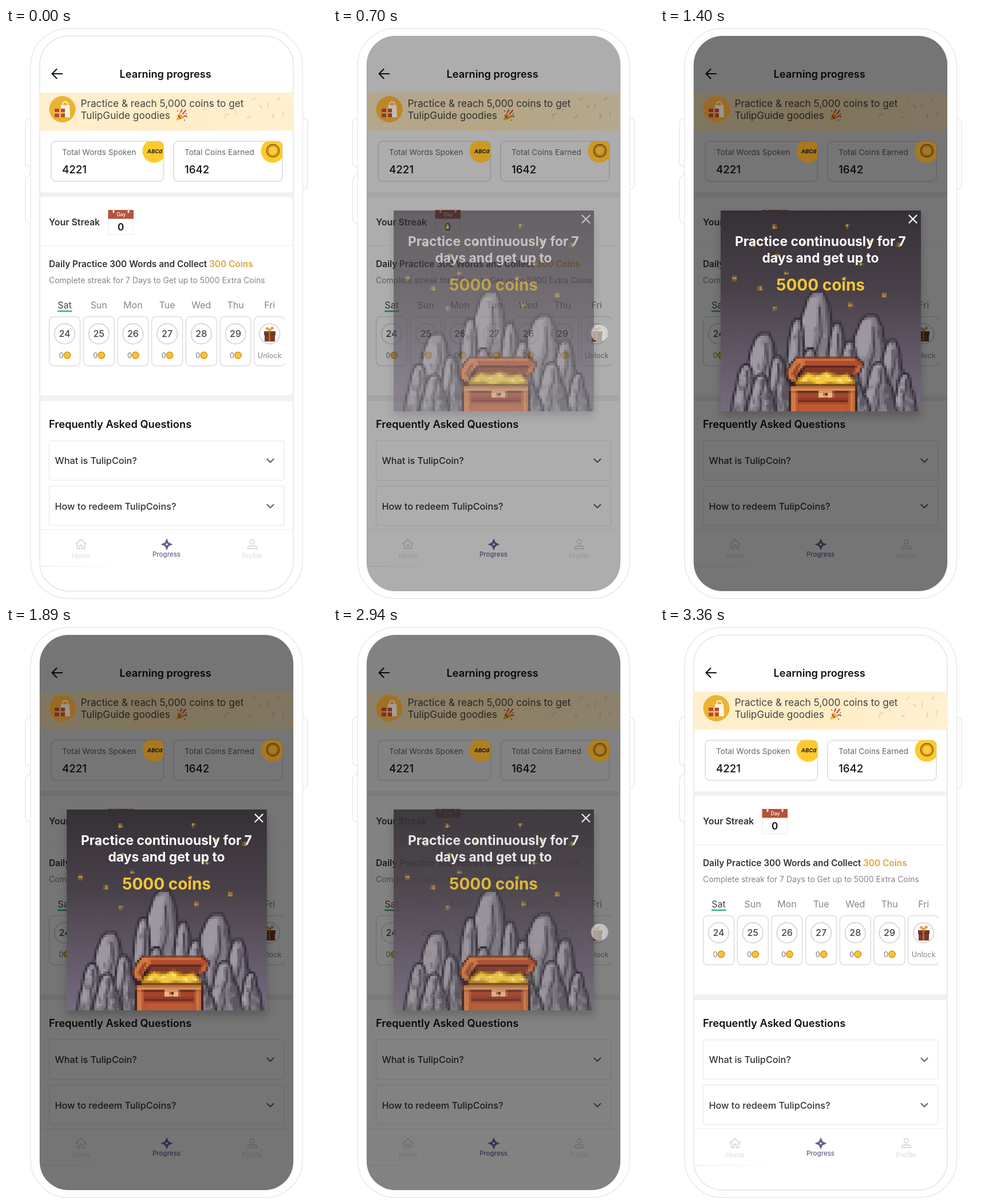
An HTML page with a canvas that plays this animation: 561x998 px, repeating every 3780 ms.

```html
<!DOCTYPE html>
<html lang="en">
<head>
<meta charset="utf-8">
<title>Learning progress</title>
<style>
html, body { margin: 0; width: 100%; height: 100%; overflow: hidden; background: #fff; }
svg, canvas { position: absolute; left: 0; top: 0; }
svg { font-family: Inter, Roboto, sans-serif; }
#art { left: 106px; top: 319px; width: 350px; height: 351px; image-rendering: pixelated; box-shadow: 0 9px 14px rgba(0,0,0,.22); }
.m { text-anchor: middle; }
.w5 { font-weight: 500; }
.w6 { font-weight: 600; }
.w7 { font-weight: 700; }
.line { fill: none; stroke-linecap: round; stroke-linejoin: round; }
</style>
</head>
<body>
<svg id="base" width="561" height="998" viewBox="0 0 561 998">
  <defs>
    <clipPath id="screen"><rect x="59" y="14" width="443" height="970" rx="50"/></clipPath>
    <clipPath id="stats"><rect x="79" y="198" width="196.500" height="70" rx="8"/><rect x="293" y="198" width="190" height="70" rx="8"/></clipPath>
    <clipPath id="week"><rect x="70" y="500" width="417" height="100"/></clipPath>
    <linearGradient id="sand"><stop stop-color="#ffefcf"/><stop offset=".5" stop-color="#ffedc6"/><stop offset="1" stop-color="#fff0d2"/></linearGradient>
    <linearGradient id="fade"><stop stop-color="#e2e2e2"/><stop offset="1" stop-color="#e2e2e2" stop-opacity="0"/></linearGradient>
  </defs>

  <g fill="#fff" stroke="#e9e9e9" stroke-width="1.500">
    <path d="M43 157 Q34 159 34 167 V235 Q34 241 39 241 Q43 242 43 249 Q43 257 39 259 Q34 261 34 268 V331 Q34 340 43 342"/>
    <path d="M518 157 Q527 159 527 167 V273 Q527 281 518 283"/>
    <rect x="43" y=".7" width="475.500" height="996.500" rx="66"/>
    <rect x="59" y="14" width="443" height="970" rx="50" stroke="#e4e4e6"/>
  </g>

  <g clip-path="url(#screen)">
    <path class="line" d="M98 80H81M88.500 72L80.500 80L88.500 88" stroke="#111" stroke-width="2.200"/>
    <text class="w6" x="198.500" y="87" font-size="18.200" fill="#111">Learning progress</text>

    <g fill="#fff" stroke="#d8dae0" stroke-width="1.500">
      <rect x="79" y="198" width="196.500" height="70" rx="8"/>
      <rect x="293" y="198" width="190" height="70" rx="8"/>
    </g>
    <g font-size="13.700" fill="#666"><text x="98" y="222">Total Words Spoken</text><text x="312" y="222">Total Coins Earned</text></g>
    <g class="w5" font-size="18.700" fill="#111"><text x="98" y="254">4221</text><text x="312" y="254">1642</text></g>

    <path d="M59 287h444v8.500h-444zM59 642h444v10h-444z" fill="#f1f1f2"/>
    <path d="M59 380.500h444M59 876.500h444" stroke="#eee"/>
    <rect x="59" y="940.500" width="150" height="1" fill="url(#fade)"/>

    <text class="w6" x="75" y="345" font-size="15.900" fill="#333">Your Streak</text>
    <rect x="179" y="319" width="43.500" height="42" fill="#fff" stroke="#e6e6e6"/>
    <path d="M178.500 318h44.500v15.500h-44.500z" fill="#b4533d"/>
    <path class="line" d="M188 317v5M214 317v5" stroke="#f3dfdc" stroke-width="3"/>
    <text class="m w5" x="201.500" y="329" font-size="8.500" fill="#fff">Day</text>
    <text class="m w6" x="200.500" y="353.500" font-size="17" fill="#111">0</text>

    <text class="w6" x="75" y="418" font-size="15.400" fill="#333">Daily Practice 300 Words and Collect <tspan fill="#dca63b">300 Coins</tspan></text>
    <text x="75" y="445.500" font-size="13.950" fill="#858585">Complete streak for 7 Days to Get up to 5000 Extra Coins</text>
    <g id="days"></g>
    <path d="M90 495h25.500" stroke="#35b57e" stroke-width="2.600"/>

    <text class="w6" x="75" y="698.500" font-size="18.300" fill="#111">Frequently Asked Questions</text>
    <g fill="#fff" stroke="#ebebf4" stroke-width="1.500">
      <rect x="75.500" y="721.500" width="410.500" height="69" rx="3"/>
      <rect x="75.500" y="800.500" width="410.500" height="69" rx="3"/>
    </g>
    <g class="w5" font-size="16.200" fill="#333">
      <text x="85.500" y="762">What is TulipCoin?</text>
      <text x="85.500" y="841.500">How to redeem TulipCoins?</text>
    </g>
    <path class="line" d="M456.500 753.500l5.500 5.500l5.500-5.500M456.500 833l5.500 5.500l5.500-5.500" stroke="#666" stroke-width="2.200"/>

    <g class="line" stroke="#d9d9dc" stroke-width="1.800">
      <path d="M122 902l9-8l9 8M124.500 901v9h4.500v-6h4v6h4.500v-9"/>
      <circle cx="430.500" cy="898" r="3.800"/>
      <path d="M422.500 910v-2q0-3 8-3t8 3v2z"/>
    </g>
    <g class="m" font-size="11.500" fill="#dcdce0"><text x="131" y="926.500">Home</text><text x="430" y="926.500">Profile</text></g>

    <rect id="dim" x="59" y="14" width="444" height="971"/>

    <g id="soft">
      <path d="M59 113h444v66.500h-444z" fill="url(#sand)"/>
      <path class="line" stroke="#f4bd9b" stroke-width="2.600" opacity=".6" d="M443 135l4 4M467 150v7M357 130l4 6M389 150l-5 2M422 157l5-3M475 126l3-4"/>
      <path class="line" stroke="#e6d8b5" stroke-width="2.600" opacity=".7" d="M345 143l5-3M371 127l6 3M401 143v6M436 122l-5 4M458 131v9M484 146v8M383 153v5"/>
      <g font-size="17.200" fill="#444"><text x="130.500" y="137.500">Practice &amp; reach 5,000 coins to get</text><text x="130.500" y="159">TulipGuide goodies</text></g>
      <path d="M297 162l6-14l9 9z" fill="#e8b13f"/>
      <path class="line" d="M305 147q3-4 2-4M311 154q4-1 5 1M309 150l5-6M301 153l4 5" stroke="#cf4c43" stroke-width="2.200"/>
      <path d="M299 144h2v2h-2zM314 149h2v2h-2zM311 160h2v2h-2z" fill="#5b80b8"/>
      <g class="m">
        <path d="M281 892l3.300 7.200l7.200 3.300l-7.200 3.300l-3.300 7.200l-3.300-7.200l-7.200-3.300l7.200-3.300z" fill="#67628d"/>
        <circle cx="281" cy="902.500" r="1.700" fill="#fff"/>
        <text class="w5" x="280.500" y="924" font-size="11.500" fill="#65608a">Progress</text>
      </g>
    </g>
    <g id="gold">
      <circle cx="98.500" cy="142" r="23" fill="#ebb332"/>
      <path d="M96 135h15l1 21h-17z" fill="#fff3e4"/>
      <path class="line" d="M99 138v-4q0-5 4.500-5t4.500 5v4" stroke="#fff3e4" stroke-width="1.800"/>
      <path d="M85 141h18v15h-18z" fill="#b94a32"/>
      <path d="M85 147h18v2.500h-18zM93 141h3v15h-3z" fill="#f0bd61"/>
      <g clip-path="url(#stats)">
        <circle cx="259" cy="215" r="20.500" fill="#ffca2b"/>
        <circle cx="466" cy="215" r="20.500" fill="#ffca2b"/>
      </g>
      <text class="m w7" x="260" y="218.500" font-size="9.500" font-style="italic" fill="#222">ABCd</text>
      <circle cx="466.500" cy="214.500" r="11" fill="#f1b32b" stroke="#7d5514" stroke-width="1.400"/>
      <circle cx="466.500" cy="214.500" r="8.300" fill="#ffca36" stroke="#a9761d"/>
    </g>
  </g>
</svg>

<canvas id="art" width="88" height="88"></canvas>

<svg width="561" height="998" viewBox="0 0 561 998">
  <g id="words" class="m w7" fill="#fff">
    <text x="280.500" y="381" font-size="22.800">Practice continuously for 7</text>
    <text x="280.500" y="409.500" font-size="22.800">days and get up to</text>
    <text x="280.500" y="458.500" font-size="28" fill="#f3c637">5000 coins</text>
    <path class="line" d="M435.500 327.500l13 13M448.500 327.500l-13 13" stroke="#fff" stroke-width="2.300"/>
  </g>
  <circle id="tap" cx="466" cy="533.500" r="15" fill="#f4f2f2" stroke="#bbb" stroke-opacity=".5"/>
</svg>

<script>
const $ = id => document.getElementById(id);

// Week strip
const week = ['Sat', 'Sun', 'Mon', 'Tue', 'Wed', 'Thu', 'Fri'];
const gift = `<path d="M451 530h20v6h-20zM452 536h18v12h-18z" fill="#7a3a29"/>
  <path d="M451 536h20" stroke="#4c2119"/>
  <path d="M459 529h3v19h-3z" fill="#a9702f"/>
  <path d="M461 530l-8-4l3-4l5 4l4-5l4 4z" fill="#d9a646"/>`;
$('days').innerHTML = week.map((day, i) => {
  const x = 102.5 + i * 59.7, last = i == 6;
  return `<text class="m" x="${x}" y="490" font-size="16" fill="${i ? '#858585' : '#444'}">${day}</text>
    <g clip-path="url(#week)" fill="#fff" stroke="#dcdce0" stroke-width="1.5">
      <rect x="${x - 27}" y="504.500" width="54" height="86" rx="8"/>
      <circle cx="${x}" cy="534.500" r="17.800" stroke="#cfcfd2"/></g>` +
    (last ? gift + `<text class="m" x="${x}" y="577" font-size="12.700" fill="#858585">Unlock</text>`
    : `<text class="m w5" x="${x}" y="540" font-size="16" fill="#444">${24 + i}</text>
      <text class="m" x="${x - 6}" y="577" font-size="12.500" fill="#777">0</text>
      <circle cx="${x + 4.5}" cy="572" r="5.800" fill="#fbc42d" stroke="#cf8f23" stroke-width="1.400"/>`);
}).join('');

// Pixel scene, drawn small in stage coordinates and enlarged without smoothing
const ctx = $('art').getContext('2d');
const unit = 350 / 88;
ctx.scale(1 / unit, 88 / 351);
ctx.translate(-106, -319);
const fill = (color, d) => { ctx.fillStyle = color; ctx.fill(new Path2D(d)); };
const box = (color, x, y, w, h) => { ctx.fillStyle = color; ctx.fillRect(x, y, w, h); };

const sky = ctx.createLinearGradient(0, 319, 0, 670);
sky.addColorStop(0, '#352f36');
sky.addColorStop(.4, '#494149');
sky.addColorStop(1, '#766b7f');
box(sky, 106, 319, 350, 351);

let seed = 7;
const rand = () => (seed = seed * 16807 % 2147483647) / 2147483647;

// Unit crag: x from -1 to 1 around the peak, y from 0 at the peak to 1 at the foot
const OUTLINE = [[-1, 1], [-.85, .66], [-.68, .5], [-.52, .22], [-.3, .05], [-.12, 0], [.2, 0], [.4, .12], [.52, .38], [.74, .5], [.86, .7], [1, 1]];
const LIT = [[-.3, .06], [.05, .04], [.02, .25], [-.18, .5], [-.3, .8], [-.7, .9], [-.72, .6], [-.5, .25]];
const SHADE = [[.2, 0], [.4, .12], [.52, .38], [.74, .5], [1, 1], [.5, 1], [.22, .66], [.36, .4]];
const CRACK = [[.08, .12], [.14, .36], [-.08, .55], [.02, .78], [-.15, 1]];
const FOOT = 674;

function crag(peak, top, left, right) {
  const place = points => new Path2D('M' + points.map(([u, v]) =>
    [peak + u * (u < 0 ? peak - left : right - peak), top + v * (FOOT - top)]).join('L'));
  const shape = place(OUTLINE);
  ctx.save();
  ctx.fillStyle = '#7e7983';
  ctx.fill(shape);
  ctx.clip(shape);
  ctx.fillStyle = '#9c97a0';
  ctx.fill(place(LIT));
  ctx.fillStyle = '#5d5763';
  ctx.fill(place(SHADE));
  for (let i = 0; i < 40; i++) {
    const x = left + rand() * (right - left), y = top + rand() * (FOOT - top);
    box(rand() < .55 ? 'rgba(185,181,189,.35)' : 'rgba(50,44,56,.3)', x, y, unit, 4 + rand() * 8);
  }
  ctx.strokeStyle = '#3a343f';
  ctx.lineWidth = 3;
  ctx.stroke(place(CRACK));
  ctx.restore();
  ctx.strokeStyle = '#332e38';
  ctx.lineWidth = 4;
  ctx.stroke(shape);
}

const crags = [
  [274, 460, 222, 330], [240, 508, 212, 264], [308, 515, 284, 338], [262, 560, 236, 290],
  [368, 502, 312, 420], [332, 547, 302, 354], [405, 546, 376, 438], [428, 604, 406, 449], [382, 585, 350, 414], [342, 622, 318, 368],
  [181, 534, 136, 226], [204, 574, 182, 238], [150, 588, 124, 176], [176, 606, 150, 204]
];
crags.forEach(c => crag(...c));

// Chest
fill('#3a1c1c', 'M220 604L226 588L237 575H345L357 586L350 604L338 608V628H232L222 614Z');
fill('#b24c2d', 'M238 577H342L353 586L344 590H252Z');
fill('#d17a43', 'M240 577H340V581H240ZM223 602L229 590L238 578L250 580L254 588L240 604L235 620L225 612Z');
fill('#9a4029', 'M231 604L240 588L247 586L240 600L234 612Z');
fill('#823a28', 'M254 592H346L336 607H246Z');
fill('#c9653a', 'M344 589L354 586L348 602L336 608Z');
fill('#c18b20', 'M236 626L240 612L258 602L278 605L292 600L312 607L328 604L340 617V628H236Z');
fill('#f3ca3d', 'M242 618L258 604L274 610L290 602L304 611L326 607L334 618L318 622L296 618L278 624L262 616Z');
[[250, 613], [272, 609], [290, 607], [311, 614], [328, 613]].forEach(([x, y]) => box('#fff09a', x, y, 6, 4));
box('#3a1c1c', 225, 624, 119, 47);
box('#df8a51', 228, 627, 113, 8);
box('#a6452b', 232, 638, 105, 32);
box('#d17a43', 229, 635, 10, 36);
box('#d17a43', 331, 635, 9, 36);
box('#662820', 242, 649, 86, 4);
box('#bd5a34', 242, 657, 86, 13);
box('#f0b77d', 277, 635, 25, 11);
box('#5b251f', 287, 638, 6, 5);

// Stars
[[200, 348], [130, 437], [175, 455], [392, 467], [332, 484]].forEach(([x, y]) => {
  box('#dca936', x - 3, y - 3, 6, 6);
  box('#5a4530', x - 1, y - 1, 2, 2);
});
[[327, 346], [417, 379], [221, 428], [201, 490], [322, 438], [351, 412], [367, 373], [251, 376], [205, 398], [162, 379]].forEach(([x, y]) => {
  box('#e0ae3a', x - 3, y - 1, 6, 2);
  box('#e0ae3a', x - 1, y - 3, 2, 6);
});

// Timeline: opens, holds, then runs backwards
const LOOP = 3780, STEP = 70;
const dims = [.11, .32, .49, .53, .54];
const pops = [.2, .6, .88, .97, 1];
const at = (list, i) => i < 0 ? 0 : list[Math.min(i, list.length - 1)];

function draw(now) {
  const step = Math.floor(now % LOOP / STEP);
  const back = step >= 27;
  const s = back ? 53 - step : step;
  const dim = at(dims, s - 9), pop = at(pops, s - 9);
  $('dim').style.opacity = dim;
  $('soft').style.filter = `brightness(${1 - dim * .94}) saturate(${1 + dim * .6})`;
  $('gold').style.filter = `brightness(${1 - dim * .72}) hue-rotate(${-12 * dim}deg)`;
  $('art').style.opacity = $('words').style.opacity = pop;
  $('tap').style.opacity = s > 12 ? 0 : s == 12 ? .22 : s >= 7 ? .6 : back && s == 6 ? .25 : 0;
  requestAnimationFrame(draw);
}
draw(0);
</script>
</body>
</html>
```
